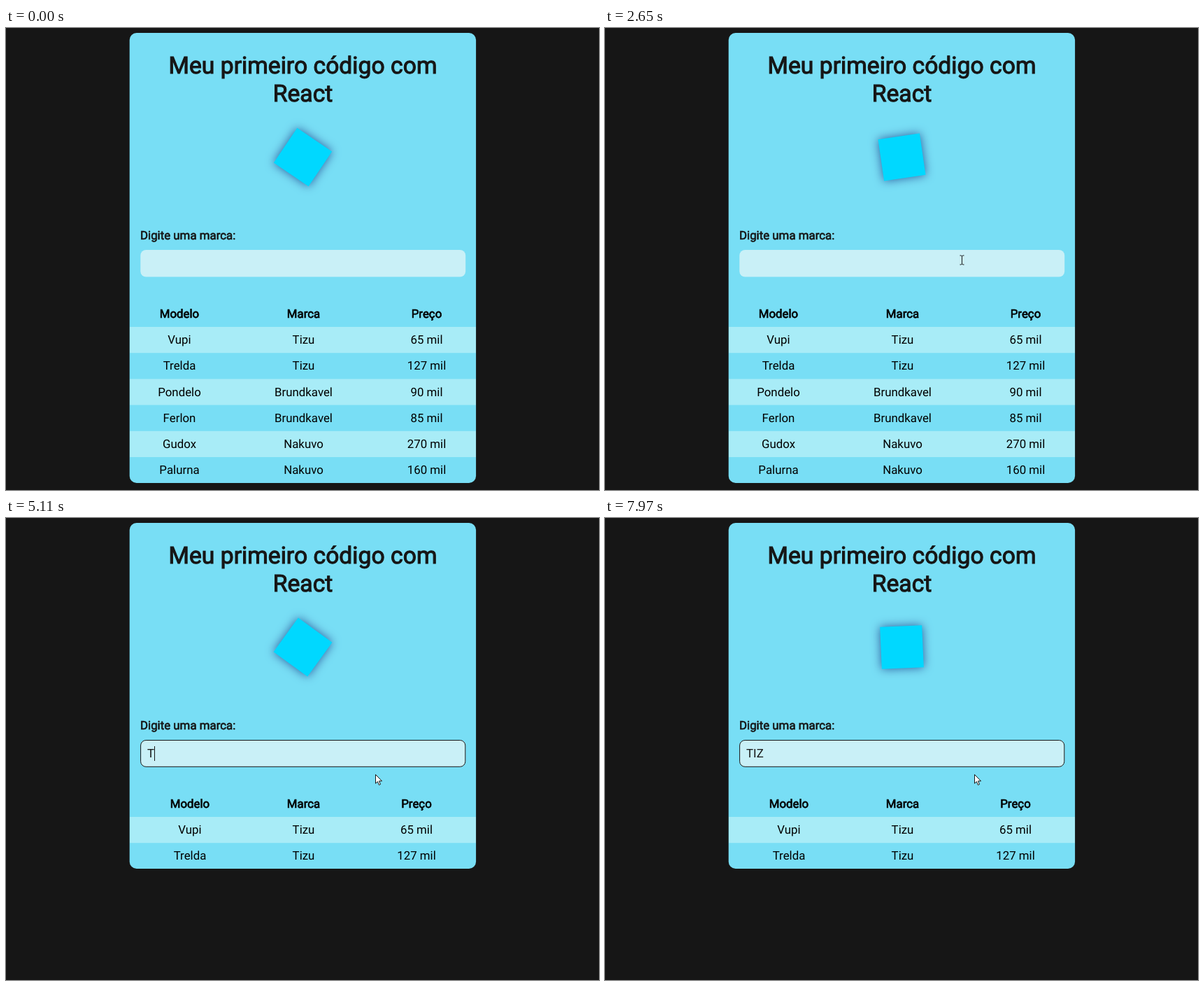
Recreate the animation shown at these times as an HTML page. Size 848 px wide and 660 px high, loop 8 s.

```html
<!DOCTYPE html>
<html lang="pt-BR">
<head>
<meta charset="utf-8">
<title>Meu primeiro código com React</title>
<style>
  html, body { margin: 0; width: 100%; height: 100%; overflow: hidden; background: #161616; }
  svg { display: block; width: 848px; height: 660px; font: 400 16.85px Roboto, sans-serif; text-rendering: geometricPrecision; }
  text { white-space: pre; }
  .middle { text-anchor: middle; }
  .strong { stroke: currentColor; stroke-width: .65px; }
  .title { font-size: 2em; stroke-width: 1.08px; }
  .ink { color: #161616; fill: #161616; }
  #logo { filter: drop-shadow(0 0 7px #2c5c9e); }
</style>
</head>
<body>
<svg viewBox="0 0 848 660">
  <rect id="card" x="176.7" y="7" width="495.4" height="643" rx="10" fill="#78def5"/>
  <g class="middle strong title ink">
    <text x="424.5" y="65">Meu primeiro código com</text>
    <text x="424.5" y="105">React</text>
  </g>
  <g id="logo">
    <rect id="mark" x="-30" y="-30" width="60" height="60" fill="#00d8ff"/>
  </g>
  <text class="strong ink" x="192" y="302">Digite uma marca:</text>
  <rect x="192.3" y="317" width="464.9" height="38.6" rx="8" fill="#c9f0f7"/>
  <rect id="focus" x="192.6" y="317.5" width="464.2" height="37.8" rx="7.5" fill="none" stroke="#161616"/>
  <text id="typed" class="ink" x="202" y="342"></text>
  <rect id="caret" y="326" width="1" height="21" fill="#161616"/>
  <g id="table" class="middle"></g>
  <path id="arrow" d="M.5 .5V13.2L3.4 10.5L5.4 15.4L7.5 14.5L5.5 9.8H9.6Z" fill="#fff" stroke="#161616"/>
  <path id="beam" d="M-3 -6.5H-1L0 -5.5L1 -6.5H3M0 -5.5V5.5M-3 6.5H-1L0 5.5L1 6.5H3" fill="none" stroke="#161616"/>
</svg>
<script>
const LOOP = 8000, FOCUS_AT = 2900, ROW = 37.2, TABLE_TOP = 427;
const byId = id => document.getElementById(id);

const cars = [
  ['Vupi', 'Tizu', '65 mil'],
  ['Trelda', 'Tizu', '127 mil'],
  ['Pondelo', 'Brundkavel', '90 mil'],
  ['Ferlon', 'Brundkavel', '85 mil'],
  ['Gudox', 'Nakuvo', '270 mil'],
  ['Palurna', 'Nakuvo', '160 mil']
];

// time, text in the field, start of the caret's blink cycle
const typing = [
  [0, '', FOCUS_AT],
  [5110, 'T', 5110],
  [5390, 'TI', 5390],
  [5670, 'TIZ', 5670],
  [5950, 'TIZU', 5950],
  [7620, 'TIZ', 7450]
];

// time, x, y of the pointer
const pointer = [
  [2160, 620, 662], [2230, 612, 648], [2300, 580, 600], [2370, 547, 540],
  [2440, 525, 428], [2510, 510.5, 349], [2580, 510.5, 331.5],
  [3290, 510.5, 331.5], [3360, 511, 349], [3430, 528, 366], [LOOP, 528, 366]
];

function label(x, y, content, strong) {
  return `<text x="${x}" y="${Math.round(y)}"${strong ? ' class="strong"' : ''}>${content}</text>`;
}

function drawTable(filter) {
  const rows = cars.filter(car => car[1].toUpperCase().startsWith(filter));
  const columns = rows.length < cars.length ? [263, 425.5, 587] : [248, 425.5, 601.5];
  const line = (cells, y, strong) => cells.map((cell, i) => label(columns[i], y, cell, strong)).join('');
  const stripe = i => i % 2 ? '' :
    `<rect x="177" y="${TABLE_TOP + i * ROW}" width="495" height="${ROW}" fill="#a8ecf7"/>`;

  byId('table').innerHTML = line(['Modelo', 'Marca', 'Preço'], 414, true) +
    rows.map((car, i) => stripe(i) + line(car, TABLE_TOP + 24.2 + i * ROW)).join('');
  byId('card').setAttribute('height', Math.round(TABLE_TOP + rows.length * ROW) - 7);
}

function show(id, visible) {
  byId(id).style.visibility = visible ? 'visible' : 'hidden';
}

function move(id, x, y) {
  byId(id).setAttribute('transform', `translate(${x} ${y})`);
}

function pointerAt(t) {
  const i = pointer.findIndex(p => p[0] > t);
  if (i < 1) return null;
  const [t0, x0, y0] = pointer[i - 1], [t1, x1, y1] = pointer[i];
  const k = (t - t0) / (t1 - t0);
  return [x0 + (x1 - x0) * k, y0 + (y1 - y0) * k];
}

let currentText = null;

function render(t) {
  byId('mark').setAttribute('transform', `translate(424.5 184.5) rotate(${34 + t * .018})`);

  const [, value, blinkStart] = typing.filter(step => step[0] <= t).pop();
  if (value !== currentText) {
    currentText = value;
    byId('typed').textContent = value;
    drawTable(value);
  }

  const focused = t >= FOCUS_AT;
  show('focus', focused);
  show('caret', focused && (t - blinkStart) % 1000 < 500);
  byId('caret').setAttribute('x', Math.floor(202 + byId('typed').getComputedTextLength()));

  const position = pointerAt(t);
  const overField = position && position[1] > 317 && position[1] < 356;
  show('arrow', position && !overField);
  show('beam', overField);
  if (position) move(overField ? 'beam' : 'arrow', ...position);
}

const start = performance.now();
function tick() {
  render((performance.now() - start) % LOOP);
  requestAnimationFrame(tick);
}
tick();
</script>
</body>
</html>
```
